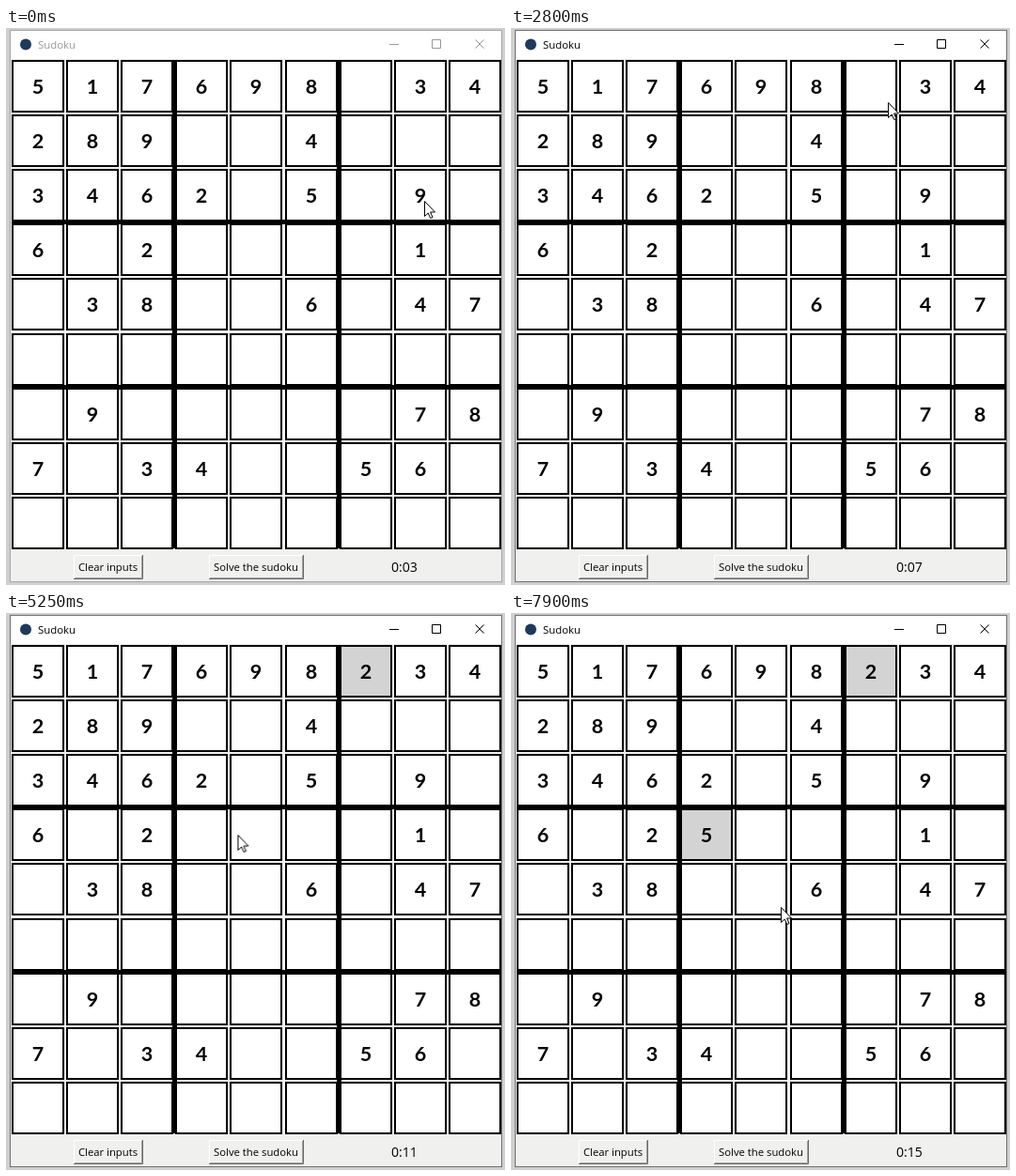
These frames come from a looping animation (531 by 593 pixels, 8 s). An HTML page:

```html
<!DOCTYPE html>
<html lang="en">
<head>
<meta charset="utf-8">
<title>Sudoku</title>
<style>
  html, body { margin: 0; width: 100%; height: 100%; overflow: hidden; background: #cfcfcf; }
  svg { display: block; }
  text { font-family: "Open Sans", "Noto Sans", sans-serif; }
  .digit { font: 700 21.5px Lato, "Open Sans", sans-serif; text-anchor: middle; }
  .label { font-size: 11.3px; text-anchor: middle; }
  .clock { font-size: 14.1px; }

  .frame, .chrome, .pick, .typed, .ticks { animation: 8s step-end infinite; }
  .frame { animation-name: frame; }
  .chrome { animation-name: chrome; }
  .ticks { animation-name: ticks; }
  .pick-a { animation-name: pick-a; }
  .pick-b { animation-name: pick-b; }
  .typed-a { animation-name: typed-a; }
  .typed-b { animation-name: typed-b; }
  .pointer { animation: pointer 8s linear infinite; }

  @keyframes frame { from { stroke: #a6a6a6; } 35%, to { stroke: #707070; } }
  @keyframes chrome { from { color: #999; } 35%, to { color: #000; } }
  @keyframes pick-a { from { fill: #fff; } 35.4%, to { fill: #d3d3d3; } }
  @keyframes pick-b { from { fill: #fff; } 71.25%, to { fill: #d3d3d3; } }
  @keyframes typed-a { from { opacity: 0; } 41.25%, to { opacity: 1; } }
  @keyframes typed-b { from { opacity: 0; } 80.5%, to { opacity: 1; } }

  @keyframes ticks {
    from { transform: translateY(0); }
    1.25% { transform: translateY(-20px); }
    10.375% { transform: translateY(-40px); }
    19.5% { transform: translateY(-60px); }
    28.625% { transform: translateY(-80px); }
    35.875% { transform: translateY(-100px); }
    45% { transform: translateY(-120px); }
    54.125% { transform: translateY(-140px); }
    63.25% { transform: translateY(-160px); }
    72.375% { transform: translateY(-180px); }
    79.25% { transform: translateY(-200px); }
    88.375% { transform: translateY(-220px); }
    97.5%, to { transform: translateY(-240px); }
  }

  @keyframes pointer {
    from, .875% { transform: translate(445px, 184px); }
    3.375% { transform: translate(451px, 188px); }
    24.875% { transform: translate(451px, 188px); animation-timing-function: cubic-bezier(.4, 0, .7, .85); }
    29.375% { transform: translate(418px, 121px); animation-timing-function: cubic-bezier(.2, .4, .5, 1); }
    34.75% { transform: translate(401px, 79px); }
    57% { transform: translate(401px, 79px); animation-timing-function: cubic-bezier(.45, 0, .8, .75); }
    59.625% { transform: translate(352px, 138px); animation-timing-function: cubic-bezier(.25, .45, .6, .9); }
    66.75% { transform: translate(240px, 242px); animation-timing-function: ease-out; }
    69.75% { transform: translate(226px, 255px); }
    91.25% { transform: translate(226px, 255px); animation-timing-function: cubic-bezier(.4, 0, .65, 1); }
    98.75%, to { transform: translate(287px, 313px); }
  }
</style>
</head>
<body>
<svg width="531" height="593" viewBox="0 0 531 593">
  <defs>
    <clipPath id="clock-window"><rect x="400" y="564" width="60" height="20"/></clipPath>
  </defs>

  <rect x="4" y="2" width="524" height="588" fill="#f0f0ef"/>
  <rect x="4" y="2" width="524" height="31" fill="#fff"/>
  <rect class="frame" x="4.5" y="2.5" width="523" height="587" fill="none"/>

  <circle cx="21" cy="17.5" r="6" fill="#1d3a5c"/>
  <g class="chrome" fill="none" stroke="currentColor">
    <text x="34" y="22" font-size="11.4" fill="currentColor" stroke="none">Sudoku</text>
    <path d="M408 17.5H418M453.5 12.5H462.5V21.5H453.5ZM499.5 12.5L508.5 21.5M508.5 12.5L499.5 21.5"/>
  </g>

  <path d="M177 34h5V554h-5zM352 34h5V554h-5zM6 204H527v5H6zM6 380H527v5H6z"/>
  <g id="board"></g>
  <g id="buttons"></g>
  <g clip-path="url(#clock-window)"><g id="ticks" class="ticks"></g></g>

  <path class="pointer" d="M.5 .5V16.5L4.2 13 6.7 18.5 9 17.5 6.6 12H11.5Z" fill="#fff" stroke="#000"/>
</svg>

<script>
  const rows = [
    "517698a34",
    "289..4...",
    "3462.5.9.",
    "6.2b...1.",
    ".38..6.47",
    ".........",
    ".9.....78",
    "7.34..56.",
    "........."
  ];
  const typed = { a: 2, b: 5 };
  const offset = i => Math.round(58.1 * i);

  function add(parent, tag, attrs, text = "") {
    const node = document.createElementNS("http://www.w3.org/2000/svg", tag);
    for (const key in attrs) node.setAttribute(key, attrs[key]);
    node.textContent = text;
    return parent.appendChild(node);
  }

  const board = document.getElementById("board");
  rows.forEach((row, r) => [...row].forEach((mark, c) => {
    const x = 6 + offset(c), y = 34 + offset(r), entry = typed[mark];
    add(board, "rect", {
      x: x + 1, y: y + 1, width: 54, height: 54,
      fill: "#fff", stroke: "#000", "stroke-width": 2,
      class: entry ? `pick pick-${mark}` : ""
    });
    if (mark !== ".") add(board, "text", {
      x: x + 28, y: y + 36,
      class: entry ? `digit typed typed-${mark}` : "digit"
    }, entry || mark);
  }));

  function button(left, right, label) {
    const group = document.getElementById("buttons"), top = 561, bottom = 587;
    const line = (d, stroke) => add(group, "path", { d, stroke, fill: "none" });
    line(`M${left + .5} ${bottom - 1}V${top + .5}H${right - 1}`, "#fff");
    line(`M${left + 1} ${bottom - 1.5}H${right - 1.5}V${top + 1}`, "#a0a0a0");
    line(`M${left} ${bottom - .5}H${right - .5}V${top}`, "#696969");
    add(group, "text", { x: (left + right) / 2 - .5, y: 578, class: "label" }, label);
  }
  button(72, 146, "Clear inputs");
  button(216, 317, "Solve the sudoku");

  const ticks = document.getElementById("ticks");
  for (let s = 3; s <= 15; s++) {
    add(ticks, "text", { x: 410, y: 579 + 20 * (s - 3), class: "clock" },
      "0:" + String(s).padStart(2, "0"));
  }
</script>
</body>
</html>
```
